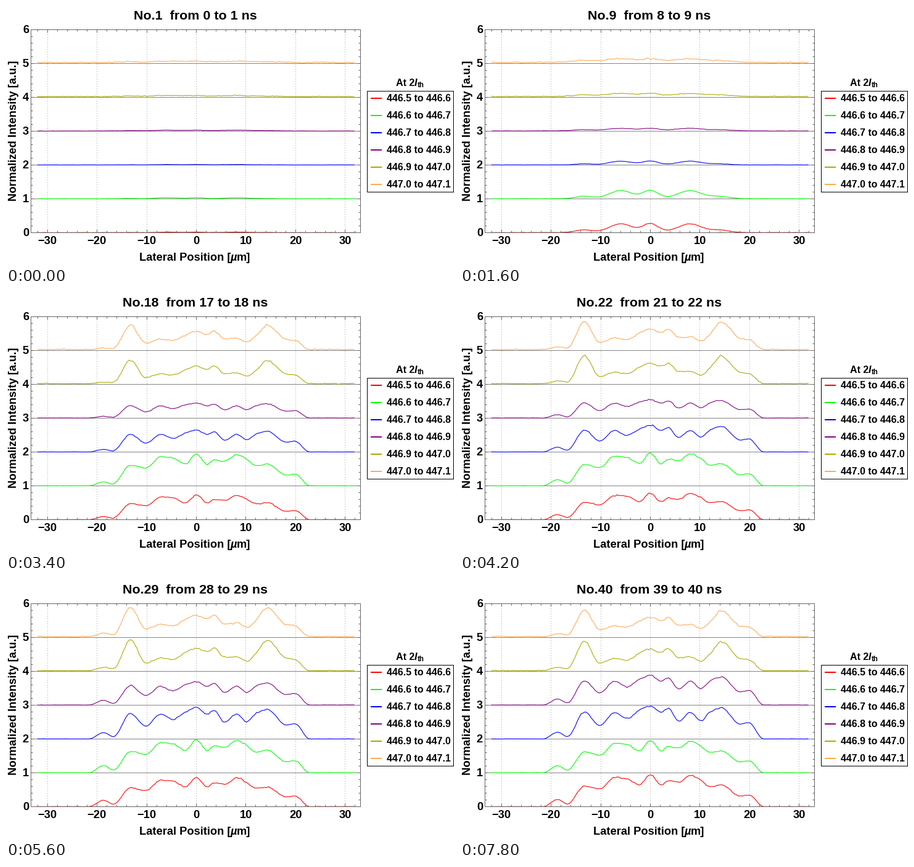
Recreate the animation shown at these times as a matplotlib script. Size 726 by 421 pixels, loop 8000 ms.

```python
import numpy as np
import matplotlib.pyplot as plt
from matplotlib.animation import FuncAnimation
from matplotlib.patches import Rectangle

W, H, DPI = 726, 421, 64
PX = 72 / DPI                      # points per pixel
FRAMES, STEP = 40, 200
LEFT, RIGHT, TOP, BOTTOM = 40.5, 574.5, 38.5, 368.5
GREY = "#666666"

plt.rcParams["font.family"] = "Liberation Sans"
plt.rcParams["font.weight"] = "bold"
plt.rcParams["path.snap"] = False


def px(v):
    return 308.5 + 8.04 * v


def py(v):
    return BOTTOM - 55 * v


def crisp(v):
    """Centre of the pixel that holds v."""
    return np.floor(v) + .5


def ease(u):
    u = np.clip(u, 0, 1)
    return u * u * (3 - 2 * u)


def smooth(x, kx, ky):
    """Monotone cubic through the knots, flat at every peak and dip."""
    kx, ky = np.asarray(kx, float), np.asarray(ky, float)
    h = np.diff(kx)
    d = np.diff(ky) / h
    prod = d[:-1] * d[1:]
    m = np.zeros_like(ky)
    ok = prod > 0
    m[1:-1][ok] = 2 * prod[ok] / (d[:-1] + d[1:])[ok]
    x = np.clip(x, kx[0], kx[-1])
    i = np.clip(np.searchsorted(kx, x, side="right") - 1, 0, len(h) - 1)
    s = (x - kx[i]) / h[i]
    bend = s * (1 - s) * h[i] * ((1 - s) * m[i] - s * m[i + 1])
    return ky[i] + (ky[i + 1] - ky[i]) * ease(s) + bend


xs = np.linspace(-32, 31.8, 160)

# Weak profile before turn-on: a few soft humps
weak = sum(a * np.exp(-((xs - c) / w) ** 2 / 2)
           for c, w, a in [(-13.5, 1.6, .27), (-6, 2.2, .9), (0, 1.5, .9),
                           (8, 2.3, .9), (14, 1.8, .25), (0, 9, .1)])

# Strong profiles: inner, even and outer lobes leading
KNOTS = [-21.6, -18.7, -16.7, -13.3, -10.2, -7.2, -4.8, -2.2, 0, 2.2, 3.6,
         5.7, 8.1, 10.2, 12, 14.3, 18.1, 19.9, 22.8]
inner = smooth(xs, KNOTS, [0, .21, .08, .62, .53, .87, .84, .65, .96, .64, .78,
                           .73, .94, .79, .6, .65, .32, .35, 0])
even = smooth(xs, KNOTS, [0, .2, .07, .8, .4, .79, .61, .85, .98, .79, .9,
                          .53, .79, .54, .8, .93, .44, .48, 0])
outer = smooth(xs, KNOTS, [0, .1, .06, .9, .23, .38, .33, .54, .66, .56, .67,
                           .39, .42, .28, .51, .88, .37, .33, 0])


class Band:
    def __init__(self, color, shape, levels, faint, floor=.003, power=1):
        self.color, self.shape, self.levels = color, shape, levels
        self.faint, self.floor = faint, floor
        self.weak = weak ** power

    def profile(self, t, rng):
        first, last = self.faint
        before = (first + (last - first) * min(t / 8, 1) ** 2) * self.weak
        after = np.interp(t, [17, 24, 39], self.levels) * self.shape
        # the far left lobe fills in last
        after = after * np.where(xs < -16.7, .5 + .5 * ease((t - 15) / 9), 1)
        u = ease((t - 8) / 9)
        v = (1 - u) * before + u * after
        v = v + self.floor * np.clip(1 - 2 * v, 0, 1)
        jitter = rng.normal(size=xs.size) * (.001 + .2 * self.floor + .01 * v)
        return np.maximum(v + jitter, 0)


bands = [
    Band("#ff0000", inner, (.77, .87, .99), (.015, .27)),
    Band("#00ff00", inner, (.99, 1.03, 1), (.03, .25)),
    Band("#0000ff", even, (.66, .92, 1), (.012, .115)),
    Band("#800080", even, (.46, .64, .9), (.025, .08), .006, .6),
    Band("#aaaa00", outer, (.8, 1.05, 1), (.035, .1), .022, .5),
    Band("#ffaa55", outer, (.85, 1.04, .9), (.045, .12), .03, .5),
]

fig = plt.figure(figsize=(W / DPI, H / DPI), dpi=DPI, facecolor="white")
ax = fig.add_axes([0, 0, 1, 1])
ax.set_xlim(0, W)
ax.set_ylim(H, 0)
ax.axis("off")


def seg(x0, y0, x1, y1, color=GREY, width=1, **kw):
    ax.plot([x0, x1], [y0, y1], color=color, lw=width * PX,
            solid_capstyle="butt", **kw)


def label(x, y, s, size, **kw):
    return ax.text(x, y, s, fontsize=size * PX, va="baseline", **kw)


def box(x0, y0, x1, y1, color):
    ax.add_patch(Rectangle((x0, y0), x1 - x0, y1 - y0, fill=False,
                           ec=color, lw=PX, zorder=4))


# Grid, frame and ticks
for v in range(-30, 31, 10):
    seg(crisp(px(v)), TOP, crisp(px(v)), BOTTOM, "#999999", zorder=1,
        dashes=(1, 3))
for v in range(1, 6):
    seg(LEFT, py(v), RIGHT, py(v), "#858585", zorder=2)
box(LEFT, TOP, RIGHT, BOTTOM, GREY)
for v in range(-32, 33, 2):
    n = 5 if v % 10 == 0 else 3
    x = crisp(px(v))
    seg(x, BOTTOM, x, BOTTOM - n, zorder=4)
    seg(x, TOP, x, TOP + n, zorder=4)
for i in range(31):
    n = 5 if i % 5 == 0 else 3
    y = crisp(py(i / 5))
    seg(LEFT, y, LEFT + n, y, zorder=4)
    seg(RIGHT, y, RIGHT - n, y, zorder=4)

# Labels
for v in range(-30, 31, 10):
    label(px(v) - (.7 if v < 0 else 0), 387.3, str(v).replace("-", "\u2212"),
          18.4, ha="center")
for v in range(7):
    label(37, py(v) + 5.4, str(v), 18.4, ha="right")
label(216.2, 414, "Lateral Position [", 18.2)
label(363.3, 414, "\u00b5", 18.2, style="italic")
label(373.7, 414, "m]", 18.2)
label(17.5, 202.5, "Normalized Intensity [a.u.]", 18.4, ha="center",
      rotation=90, rotation_mode="anchor")
title = label(306.5, 22, "", 21.4, ha="center")

# Legend
label(631.5, 129.6, "At 2", 16)
label(661.7, 129.6, "I", 16, style="italic")
label(667, 132.4, "th", 11.5)
box(585.5, 138.5, 725.5, 302.5, "black")
for k, b in enumerate(bands):
    y = 150 + 28 * k
    seg(591, y, 609, y, b.color, 2)
    label(617.4, y + 5.3, f"{446.5 + k / 10:.1f} to {446.6 + k / 10:.1f}", 15.9)

curves = [ax.plot([], [], color=b.color, lw=1.1 * PX, zorder=3)[0]
          for b in bands]


def draw(t):
    rng = np.random.default_rng(500 + t)
    title.set_text(f"No.{t + 1}  from {t} to {t + 1} ns")
    for k, (b, line) in enumerate(zip(bands, curves)):
        line.set_data(px(xs), py(k + b.profile(t, rng)))
    return [title, *curves]


anim = FuncAnimation(fig, draw, frames=FRAMES, interval=STEP,
                     init_func=lambda: draw(0), repeat=True, repeat_delay=0,
                     blit=False, cache_frame_data=False)
plt.show()
```
